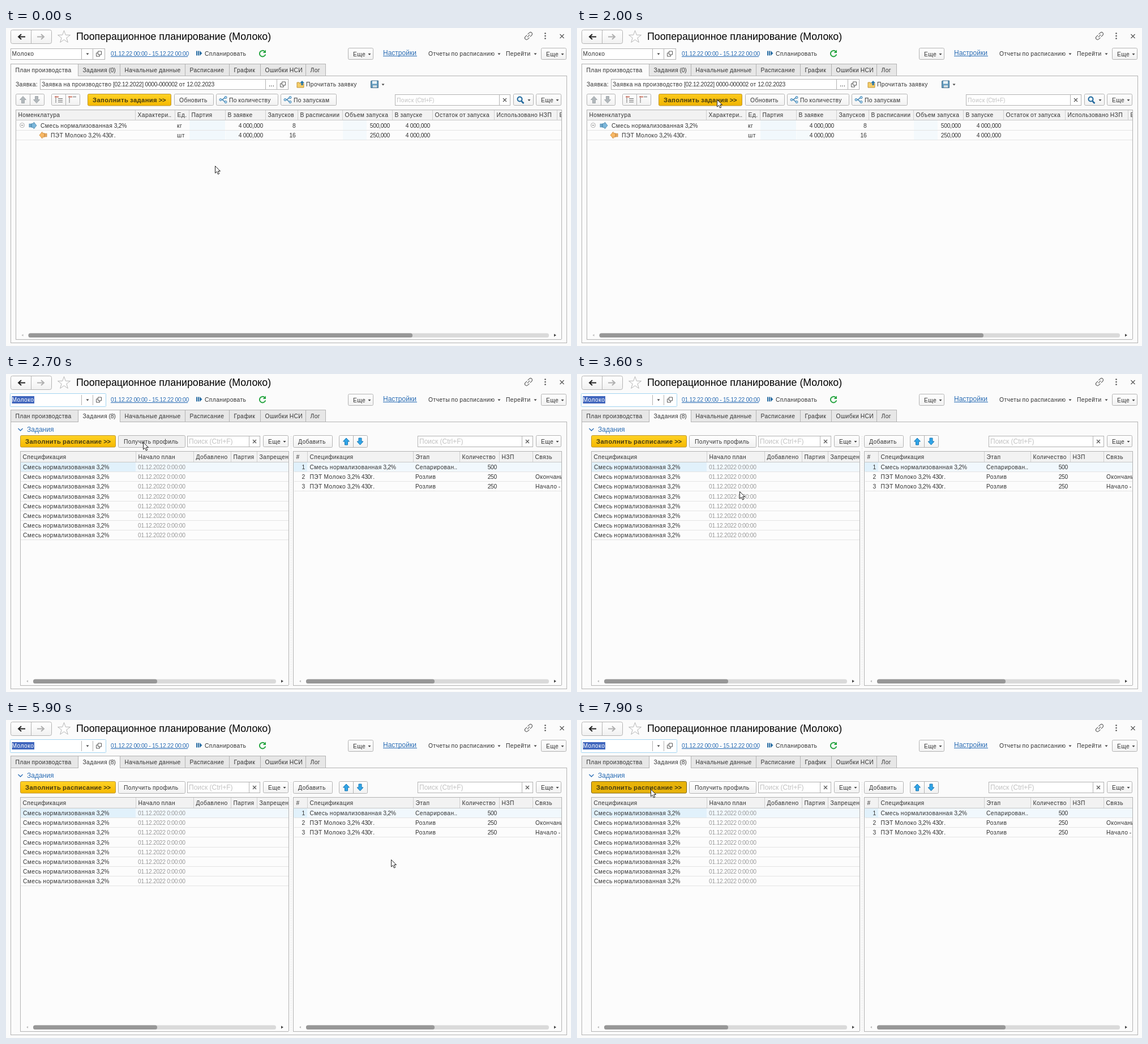
An HTML page that plays this animation: 998 px wide and 561 px high, repeating every 8000 ms.

```html
<!DOCTYPE html>
<html lang="ru">
<head>
<meta charset="utf-8">
<style>
html, body { margin: 0; width: 100%; height: 100%; overflow: hidden; background: #fbfbfb; }
svg { display: block; width: 998px; height: 561px; }
text { font: 10.3px "Liberation Sans", Arial, sans-serif; letter-spacing: -.28px; fill: #333; white-space: pre; }
.cyr { letter-spacing: .4px; }
.title { font-size: 17.8px; fill: #000; }
.big { font-size: 12px; }
.title, .big, .title .cyr, .big .cyr { letter-spacing: 0; }
.bold { font-size: 11.2px; font-weight: bold; fill: #453a10; }
.blue { fill: #2a6db5; }
.gray { fill: #999; }
.hint { fill: #c2c2c2; }
.white { fill: #fff; }
.end { text-anchor: end; }
.gold { fill: url(#gold); stroke: #bd9530; }
.gold.hover { fill: url(#goldHover); }
.gold.pressed { fill: #e8b30a; stroke: #7d6413; }
.hidden { display: none; }
</style>
</head>
<body>
<svg id="stage" viewBox="0 0 998 561"></svg>
<script>
const stage = document.getElementById('stage');
const LINE = '#b3b3b3', GRID = '#e4e4e4', HEAD = '#f2f2f2';

const spaced = s => s.replace(/>/g, '&gt;').replace(/[А-яЁё]+/g, '<tspan class="cyr">$&</tspan>');
const text = (x, y, s, cls = '') => `<text x="${x}" y="${y}" class="${cls}">${spaced(s)}</text>`;
const rect = (x, y, w, h, fill, stroke = 'none', r = 0, extra = '') =>
  `<rect x="${x}" y="${y}" width="${w}" height="${h}" fill="${fill}" stroke="${stroke}" rx="${r}" ${extra}/>`;
const path = (d, stroke = 'none', fill = 'none', width = 1, extra = '') =>
  `<path d="${d}" stroke="${stroke}" fill="${fill}" stroke-width="${width}" ${extra}/>`;
const at = (x, y, s) => `<g transform="translate(${x} ${y})">${s}</g>`;
const vline = (x, y1, y2, color = LINE) => path(`M${x + .5} ${y1}V${y2}`, color);
const hline = (x1, x2, y, color = LINE) => path(`M${x1} ${y + .5}H${x2}`, color);
const box = (x1, y1, x2, y2, fill = '#fff', r = 0, stroke = LINE) =>
  rect(x1 + .5, y1 + .5, x2 - x1 - 1, y2 - y1 - 1, fill, stroke, r);

const caret = (x, y) => path(`M${x - 2.5} ${y - 1}h5l-2.5 3z`, 'none', '#444');
const cross = (x, y, r = 3) => path(`M${x - r} ${y - r}l${2 * r} ${2 * r}m0 ${-2 * r}l${-2 * r} ${2 * r}`, '#555', 'none', 1.2);
const popup = (x, y) => at(x, y, path('M-1.5-4.5h6v6h-6zM-1.5-1.5h-3v6h6v-3', '#555'));
const button = (x1, y1, x2, y2, label = '', tx = x1 + 9, extra = '') =>
  `<g ${extra}>${box(x1, y1, x2, y2, 'url(#btn)', 2)}${text(tx, (y1 + y2) / 2 + 4, label)}</g>`;
const more = (x, y) => button(x, y, x + 45, y + 21, 'Еще', x + 9) + caret(x + 38, y + 11);
const goldButton = (id, x, y, w, label) =>
  `<rect id="${id}" class="gold" x="${x + .5}" y="${y + .5}" width="${w - 1}" height="20.500" rx="2"/>` + text(x + 9, y + 14.5, label, 'bold');
const search = (x1, x2, y, cls) => box(x1, y, x2, y + 20) + vline(x2 - 20, y, y + 20) +
  cross(x2 - 10, y + 10) + text(x1 + 3, y + 14, 'Поиск (Ctrl+F)', 'hint ' + cls);
const arrowUp = (x, y, color, edge, flip = 1) =>
  at(x, y, path('M0-6L5.5 0H2.5V6H-2.5V0H-5.5z', edge, color, 1, `transform="scale(1 ${flip})"`));
const arrowSide = (x, y, color, edge, flip = 1) =>
  at(x, y, path('M-6-3h1v6h-1zM-4-3h1.5v6H-4zM-1.500-3.500H2V-6L7 0 2 6V3.500H-1.500z', edge, color, .8, `transform="scale(${flip} 1)"`));
const share = (x, y) => at(x, y, path('M-5 0h3L3-4M-2 0L3 4', '#3e83b3', 'none', 1.6) +
  [[-5, 0], [4, -4], [4, 4]].map(([a, b]) => `<circle cx="${a}" cy="${b}" r="2" fill="#b9dcf2" stroke="#3e83b3"/>`).join(''));
const scrollbar = (x1, x2, thumb) => rect(x1, 538.5, x2 - x1, 7.5, '#dadada', 'none', 3.5) +
  rect(x1, 538.5, thumb - x1, 7.5, '#979797', 'none', 3.5) +
  path(`M${x1 - 9} 540v4l-3-2z`, 'none', '#bbb') + path(`M${x2 + 9} 539.500v5l4-2.500z`, 'none', '#444');

// cols: [left edge, label]
const table = (x1, y, x2, cols, head) => box(x1, y, x2, 550, '#fcfcfc') +
  rect(x1 + 1, y + 1, x2 - x1 - 2, head, HEAD) + hline(x1, x2, y + head, '#c8c8c8') +
  cols.map(([x, s], i) => (i ? vline(x, y + 1, y + head, '#cfcfcf') : '') + text(x + 4.5, y + head / 2 + 4, s)).join('');

const defs = `<defs>
  <linearGradient id="gold" x2="0" y2="1"><stop stop-color="#ffd326"/><stop offset="1" stop-color="#f5b800"/></linearGradient>
  <linearGradient id="goldHover" x2="0" y2="1"><stop stop-color="#fcca1c"/><stop offset="1" stop-color="#f0b400"/></linearGradient>
  <linearGradient id="btn" x2="0" y2="1"><stop stop-color="#fff"/><stop offset="1" stop-color="#f1f1f1"/></linearGradient>
  <clipPath id="rightEdge"><rect width="981" height="561"/></clipPath>
  <clipPath id="leftEdge"><rect width="499" height="561"/></clipPath>
</defs>`;

const projectField = frame => frame + vline(133, 37, 55) + vline(153, 37, 55) + caret(144, 45.5) + popup(164, 45.5);

function windowBar() {
  const star = Array.from({ length: 10 }, (_, i) => {
    const r = i % 2 ? 4.6 : 11.5, a = i * Math.PI / 5;
    return `${102.5 + r * Math.sin(a)},${16 - r * Math.cos(a)}`;
  }).join(' ');
  const refresh = path('M457 41.500A5.300 5.300 0 1 0 458.300 46.500', '#29a644', 'none', 2) + path('M459 38.500v5.500h-5.500z', 'none', '#29a644');
  const chain = at(923, 14, `<g transform="rotate(-45)">${path('M1-3H5a3 3 0 0 1 0 6H1M-1-3H-5a3 3 0 0 0 0 6H-1M-3 0H3', '#666', 'none', 1.2)}</g>`);
  return box(8, 3, 81, 28, 'url(#btn)', 3) + vline(44, 3, 27) +
    path('M34 15.500H22m5-4.500l-5 4.500 5 4.500', '#222', 'none', 2) +
    path('M55 15.500H67m-5-4.500l5 4.500-5 4.500', '#b0b0b0', 'none', 2) +
    `<polygon points="${star}" fill="#fff" stroke="#b5b5b5"/>` +
    text(124, 21, 'Пооперационное планирование (Молоко)', 'title') + chain +
    [9.5, 14, 18.5].map(y => `<circle cx="952.500" cy="${y}" r="1.300" fill="#555"/>`).join('') + cross(982, 14.5, 3.5) +
    text(185, 49, '01.12.22 00:00 - 15.12.22 00:00', 'blue') + hline(185, 321, 50, '#2a6db5') +
    path('M336 40.500h2v8h-2zM339 40.500h2v8h-2zM342 40l4.500 4.500-4.500 4.500z', 'none', '#2b6ea3') +
    text(351, 49, 'Спланировать') + refresh +
    more(604, 35) + text(666, 47.5, 'Настройки', 'big blue') + hline(666, 726, 49, '#2a6db5') +
    text(746, 49, 'Отчеты по расписанию') + caret(871, 45.5) + text(883, 49, 'Перейти') + caret(935, 45.5) + more(945, 35);
}

const tabEdges = [8, 127, 201, 316, 394, 449, 529, 564];
function tabs(active, count) {
  const names = ['План производства', `Задания (${count})`, 'Начальные данные', 'Расписание', 'График', 'Ошибки НСИ', 'Лог'];
  return box(8, 84, 991, 556, '#fbfbfb') + names.map((name, i) => {
    const [x1, x2] = [tabEdges[i], tabEdges[i + 1]];
    return box(x1, 63, x2 + 1, 85, i === active ? '#fbfbfb' : '#e7e7e7') +
      (i === active ? rect(x1 + 1, 83, x2 - x1 - 1, 3, '#fbfbfb') : '') + text(x1 + 8.5, 77.5, name);
  }).join('');
}

function planView() {
  const cols = [[17, 'Номенклатура'], [228, 'Характери..'], [298, 'Ед.'], [323, 'Партия'], [387, 'В заявке'],
    [458, 'Запусков'], [515, 'В расписании'], [594, 'Объем запуска'], [682, 'В запуске'], [753, 'Остаток от запуска'],
    [862, 'Использовано НЗП'], [973, 'Е']];
  const row = (y, x, name, unit, runs, size) => text(x, y, name) + text(302, y, unit) + text(454, y, '4 000,000', 'end') +
    text(511.5, y, runs, 'end') + text(678, y, size, 'end') + text(749, y, '4 000,000', 'end') + hline(18, 981, y + 4, GRID);
  const list = (x, lines) => at(x, 126.5, path(lines, '#666') + path('M-4-6V6', '#555', 'none', 1.2, 'stroke-dasharray="2 1"') +
    path('M-6-5H1', '#c65a45', 'none', 1.5));
  const folder = at(520, 99, path('M-6-3h4l1 2h7v7H-6z', '#c09436', '#f5cd69') + path('M3-6L7-2H4.500V2h-3V-2H-1z', 'none', '#2675a8'));
  const disk = path('M645.500 93h12v12.500h-13V94z', '#446f8d', '#659cbe') + rect(647, 93.5, 8, 5, '#e8f2f7') + rect(648, 101, 7, 4, '#d2dce2');
  return projectField(box(8, 36, 175, 56)) + text(10.5, 49, 'Молоко') +
    tabs(0, 0) + text(17, 103, 'Заявка:') + box(60, 90, 499, 109) + vline(458, 90, 109) + vline(478, 90, 109) +
    text(63, 103, 'Заявка на производство [02.12.2022] 0000-000002 от 12.02.2023') + text(464, 103, '...', 'big') + popup(489, 99.5) +
    folder + text(530, 103, 'Прочитать заявку') + disk + caret(666, 99.5) +
    button(17, 116, 68, 137) + vline(42, 117, 136) + arrowUp(30, 126.5, '#b2b8bc', '#a2a8ac') + arrowUp(54, 126.5, '#b2b8bc', '#a2a8ac', -1) +
    button(80, 116, 131, 137) + vline(105, 117, 136) + list(92, 'M0-2H8M0 1H8M0 4H8') + list(116, 'M2-5H8') +
    goldButton('fillTasks', 144, 116, 148, 'Заполнить задания >>') +
    button(297, 116, 367, 137, 'Обновить') + button(371, 116, 481, 137, 'По количеству', 394) + share(384, 126.5) +
    button(485, 116, 584, 137, 'По запускам', 508) + share(498, 126.5) + search(687, 891, 117, '') +
    button(896, 116, 932, 137) + path('M910.500 129l4 4', '#1f679c', 'none', 2.5) +
    `<circle cx="907.500" cy="125.500" r="4" fill="#e5f3fa" stroke="#1f679c" stroke-width="2"/>` + caret(924, 127) + more(936, 116) +
    `<g clip-path="url(#rightEdge)">${table(17, 144, 982, cols, 18)}</g>` +
    rect(324, 163, 63, 34, '#f1f8fc') + rect(388, 181, 24, 16, '#f5fafc') + rect(595, 163, 42, 34, '#f4f9fc') +
    row(176, 61, 'Смесь нормализованная 3,2%', 'кг', '8', '500,000') + row(193, 79, 'ПЭТ Молоко 3,2% 430г.', 'шт', '16', '250,000') +
    `<circle cx="28.500" cy="171.500" r="4" fill="#fff" stroke="#aaa"/>` + path('M26.500 171.500h4', '#777') +
    arrowSide(47, 172, '#7db8dc', '#4284ad') + arrowSide(66, 189, '#f8b865', '#d08a35', -1) +
    vline(981, 144, 549) + scrollbar(39.5, 959, 718);
}

function tasksView() {
  const left = [[25, 'Спецификация'], [229, 'Начало план'], [331, 'Добавлено'], [397, 'Партия'], [443, 'Запрещен']];
  const right = [[508, '#'], [532, 'Спецификация'], [719, 'Этап'], [801, 'Количество'], [871, 'НЗП'], [930, 'Связь']];
  const rowY = i => 168 + i * 17.2;
  const jobs = Array.from({ length: 8 }, (_, i) => text(30, rowY(i), 'Смесь нормализованная 3,2%') +
    text(233, rowY(i), '01.12.2022 0:00:00', 'gray') + hline(26, 499, Math.round(rowY(i) + 4), GRID)).join('');
  const steps = [['Смесь нормализованная 3,2%', 'Сепарирован..', '500', ''], ['ПЭТ Молоко 3,2% 430г.', 'Розлив', '250', 'Окончани'],
    ['ПЭТ Молоко 3,2% 430г.', 'Розлив', '250', 'Начало - ']].map(([name, stageName, qty, link], i) => {
    const y = rowY(i);
    return text(528, y, `${i + 1}`, 'end') + text(536.5, y, name) + text(723, y, stageName) + text(867, y, qty, 'end') +
      text(935, y, link) + hline(509, 981, Math.round(y + 4), GRID);
  }).join('');
  return projectField(box(7, 34, 177, 58, '#fff', 1, '#a3d5f1')) + rect(10.5, 39, 39.5, 13, '#4066bd') + text(10.5, 49, 'Молоко', 'white') +
    tabs(1, 8) + path('M21.500 96l4 4 4-4', '#2a6db5', 'none', 1.3) + text(37, 102, 'Задания', 'big blue') +
    goldButton('fillSchedule', 25, 108, 169, 'Заполнить расписание >>') +
    button(198, 108, 317, 130, 'Получить профиль', 208, 'id="profile"') + search(320, 449, 109, 'big') + more(454, 108) +
    button(507, 108, 577, 130, 'Добавить', 516) + button(588, 108, 639, 130) + vline(613, 109, 129) +
    arrowUp(601, 119, '#30a5e8', '#1878b4') + arrowUp(625.5, 119, '#30a5e8', '#1878b4', -1) +
    search(727, 931, 109, 'big') + more(936, 108) +
    `<g clip-path="url(#leftEdge)">${table(25, 136, 500, left, 19)}${rect(26, 156, 203, 16, '#e1f1fb')}${rect(229, 156, 270, 16, '#f1f8fd')}${jobs}</g>` +
    `<g clip-path="url(#rightEdge)">${table(507, 136, 982, right, 19)}${rect(508, 156, 24, 16, '#e1f1fb')}${rect(532, 156, 449, 16, '#f1f8fd')}${steps}</g>` +
    vline(499, 136, 549) + vline(981, 136, 549) + path('M503.500 110V549', '#d2d2d2', 'none', 1, 'stroke-dasharray="1 2"') +
    scrollbar(48, 477, 267) + scrollbar(530, 959, 757);
}

stage.innerHTML = defs + rect(0, 0, 998, 561, '#fbfbfb') + windowBar() +
  `<g id="plan">${planView()}</g><g id="tasks">${tasksView()}</g>` +
  `<g id="pointer">${path('M.500.500V13l3-2.700 2 4.700 2.200-1-2-4.500H9.500z', '#222', '#fff', 1)}</g>`;

// Pointer route: [ms, x, y]
const route = [
  [0, 369, 243], [1300, 369, 243], [1400, 341, 224], [1600, 296, 182], [1800, 264, 146], [2000, 247, 126], [2200, 242, 120],
  [3100, 242, 120], [3200, 242, 129], [3400, 242, 129], [3500, 254, 163], [3600, 287, 207], [3800, 460, 268], [4000, 720, 260],
  [4100, 855, 235], [4200, 920, 180], [4300, 804, 127], [4400, 720, 132], [4500, 640, 150], [4600, 588, 180], [4700, 574, 208],
  [4800, 600, 231], [5000, 672, 249], [5200, 704, 251], [5800, 704, 251], [5900, 680, 246], [6100, 540, 214], [6300, 340, 168],
  [6500, 190, 138], [6700, 130, 124], [6800, 130, 122], [8000, 130, 122]
];
function pointerAt(t) {
  const i = route.findIndex(p => p[0] > t);
  const [t0, x0, y0] = route[i - 1], [t1, x1, y1] = route[i];
  const k = (t - t0) / (t1 - t0);
  return [x0 + (x1 - x0) * k, y0 + (y1 - y0) * k];
}

const el = id => document.getElementById(id);
const [plan, tasks, pointer, fillTasks, fillSchedule, profile] =
  ['plan', 'tasks', 'pointer', 'fillTasks', 'fillSchedule', 'profile'].map(el);
const press = (node, t, hover, down) => {
  node.classList.toggle('hover', t >= hover);
  node.classList.toggle('pressed', t >= down);
};
const start = performance.now();
function draw(now) {
  const t = Math.floor(Math.max(0, now - start) % 8000 / 100) * 100;
  const [x, y] = pointerAt(t);
  pointer.setAttribute('transform', `translate(${x} ${y})`);
  plan.classList.toggle('hidden', t >= 2700);
  tasks.classList.toggle('hidden', t < 2700);
  press(fillTasks, t, 2000, 2500);
  press(fillSchedule, t, 6800, 7300);
  profile.firstElementChild.setAttribute('fill', t < 3500 ? '#f0f0f0' : 'url(#btn)');
  requestAnimationFrame(draw);
}
draw(start);
</script>
</body>
</html>
```
